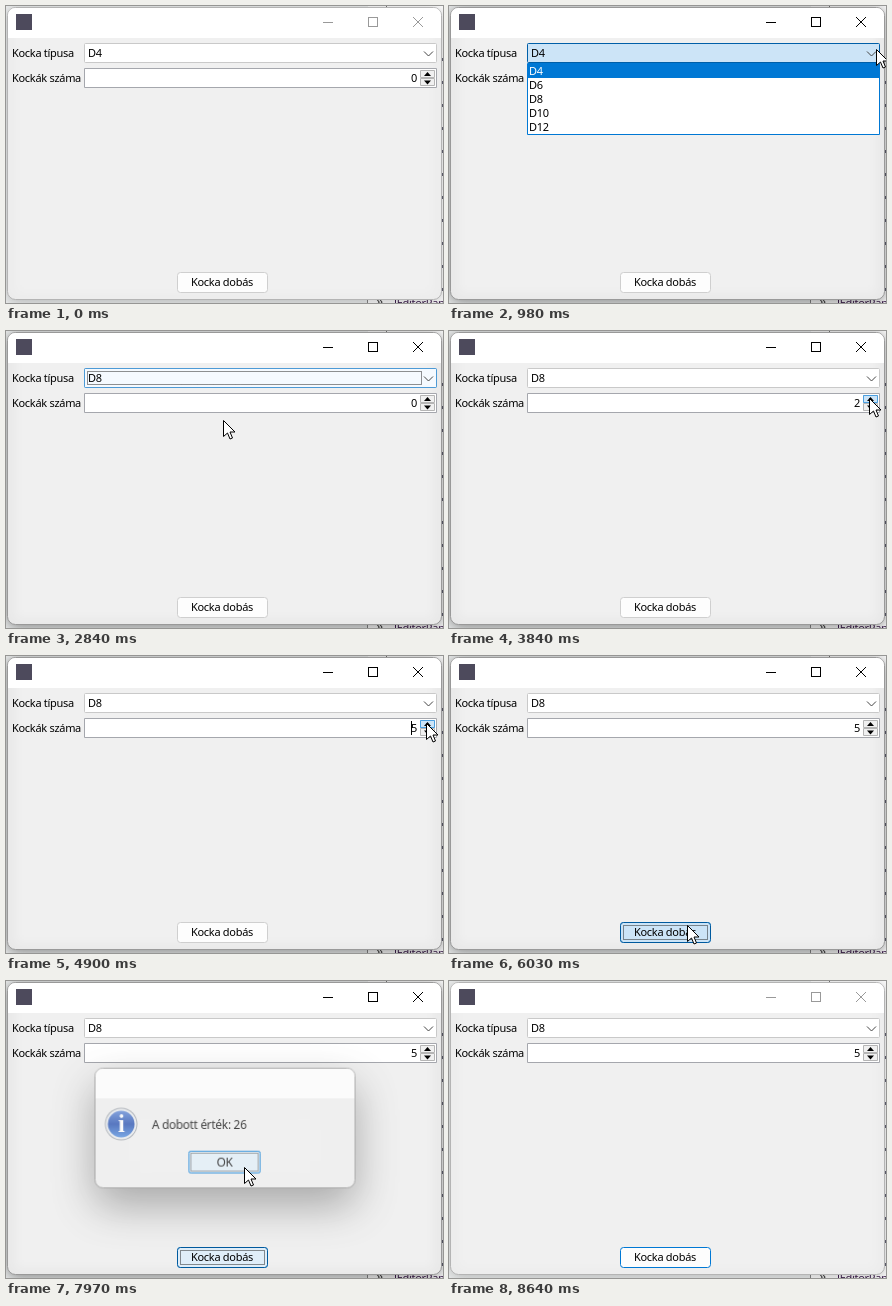
An HTML page with a canvas that plays this animation: 437x297 px, repeating every 8710 ms.

```html
<!DOCTYPE html>
<html lang="hu">
<head>
<meta charset="utf-8">
<style>
  html, body { margin: 0; height: 100%; overflow: hidden; }
  canvas { display: block; width: 437px; height: 297px; }
</style>
</head>
<body>
<canvas id="stage" width="437" height="297"></canvas>
<script>
const LOOP = 8710, W = 437, H = 297;
const BLUE = '#0078d4', PALE = '#e0eef9', FACE = '#f0f0f0';
const TYPES = ['D4', 'D6', 'D8', 'D10', 'D12'];
const CLICKS = [3450, 3720, 3990, 4260, 4570];

// Cursor stops: time, x, y
const PATH = [
  [130, 434, 300], [740, 427, 43], [1180, 427, 43], [1700, 217, 89], [2900, 217, 89],
  [3380, 420, 67], [4970, 420, 67], [5500, 238, 269], [6690, 238, 269],
  [7480, 238, 186], [8050, 238, 186], [8500, 420, 300]
];

const screen = document.getElementById('stage').getContext('2d');
const layer = Object.assign(document.createElement('canvas'), { width: W, height: H });
const layerCtx = layer.getContext('2d');
let g = screen;

const ramp = (t, a, b) => Math.min(1, Math.max(0, (t - a) / (b - a)));
const ease = u => u * u * (3 - 2 * u);
const within = (t, a, b) => t >= a && t < b;

function box(x, y, w, h, fill, stroke, radius = 0) {
  g.beginPath();
  g.roundRect(x + .5, y + .5, w - 1, h - 1, radius);
  g.fillStyle = fill;
  g.fill();
  if (stroke) {
    g.strokeStyle = stroke;
    g.stroke();
  }
}

function line(color, ...points) {
  g.beginPath();
  points.forEach(([x, y]) => g.lineTo(x, y));
  g.strokeStyle = color;
  g.stroke();
}

function polygon(fill, ...points) {
  g.beginPath();
  points.forEach(([x, y]) => g.lineTo(x, y));
  g.closePath();
  g.fillStyle = fill;
  g.fill();
}

function text(s, x, y, { size = 11, color = '#000', align = 'left' } = {}) {
  g.font = `${size}px "Noto Sans", "Open Sans", sans-serif`;
  g.letterSpacing = '-0.3px';
  g.textAlign = align;
  g.fillStyle = color;
  g.fillText(s, x, y);
}

function dotted(x, y, w, h) {
  g.setLineDash([1, 1]);
  g.strokeStyle = '#222';
  g.strokeRect(x + .5, y + .5, w - 1, h - 1);
  g.setLineDash([]);
}

function faded(alpha, draw) {
  if (alpha <= 0) return;
  g.globalAlpha = alpha;
  draw();
  g.globalAlpha = 1;
}

function shadow(color, blur, dy, draw) {
  g.shadowColor = color;
  g.shadowBlur = blur;
  g.shadowOffsetY = dy;
  draw();
  g.shadowColor = 'transparent';
}

function cross(x, y, color) {
  line(color, [x, y], [x + 10, y + 10]);
  line(color, [x + 10, y], [x, y + 10]);
}

function desktop() {
  g.fillStyle = '#eef0f0';
  g.fillRect(0, 0, W, H);
  g.fillStyle = '#fff';
  g.fillRect(362, 0, 75, H);
  text('JEditorPane', 388, 301, { color: '#402050' });
  text('»', 370, 300, { size: 14, color: '#444' });
  line('#888', [361.5, 290], [361.5, H]);
  line('#777', [378, 3], [381, 0]);
  g.fillStyle = '#667';
  for (let y = 52; y < 290; y += 23) g.fillRect(435, y, 2, 3);
}

function frame(active) {
  const ink = active ? '#000' : '#999';
  shadow(`rgba(0,0,0,${active ? .45 : .25})`, 14, 2, () => box(1, 1, 435, 293, FACE, active ? '#999' : '#b4b4b4', 8));
  g.beginPath();
  g.roundRect(2, 2, 433, 30, [7, 7, 0, 0]);
  g.fillStyle = '#fff';
  g.fill();
  g.fillStyle = '#4d4a5c';
  g.fillRect(10, 8, 16, 16);
  line(ink, [317, 16.5], [327, 16.5]);
  g.strokeRect(362.5, 11.5, 9, 9);
  cross(407, 11, ink);
}

function combo(t) {
  const open = within(t, 850, 2640);
  const hover = open ? 1 : t < 2640 ? ramp(t, 680, 850) : 1 - ramp(t, 2640, 3200);
  box(78, 37, 353, 20, '#fff', '#c9c9c9', 1);
  faded(hover, () => box(78, 37, 353, 20, open ? '#cce4f7' : '#f0f8ff', open ? '#005fa8' : BLUE, 1));
  text(t < 2640 ? 'D4' : 'D8', 82, 51);
  line('#444', [418, 45.5], [422.5, 50], [427, 45.5]);
  if (within(t, 2640, 3450)) dotted(81, 40, 335, 14);
}

function popup(pointerY) {
  const selected = Math.max(0, Math.floor((pointerY - 58) / 14));
  box(78, 57, 353, 72, '#fff', BLUE);
  TYPES.forEach((name, i) => {
    if (i === selected) {
      g.fillStyle = BLUE;
      g.fillRect(79, 58 + 14 * i, 351, 14);
    }
    text(name, 80, 69 + 14 * i, { color: i === selected ? '#fff' : '#000' });
  });
}

function spinner(t) {
  const count = CLICKS.filter(c => t >= c).length;
  const pressed = CLICKS.some(c => within(t, c - 20, c + 90));
  const hover = ramp(t, 3300, 3450) * (1 - ramp(t, 5030, 5430));
  box(78, 62, 353, 20, '#fff', '#a5a7ad');
  text(count, 411, 76, { align: 'right' });
  if (within(t, 4900, 5430) || within(t, 5890, 6030)) {
    g.fillStyle = '#000';
    g.fillRect(405, 65, 1, 14);
  }
  box(414, 64, 15, 8, FACE, '#b5b5b5');
  box(414, 72, 15, 8, FACE, '#b5b5b5');
  faded(hover, () => box(414, 64, 15, 8, pressed ? '#a8d1f2' : '#cce4f7', '#4a9fe0'));
  polygon('#000', [418, 70], [421.5, 66], [425, 70]);
  polygon('#000', [418, 74.5], [421.5, 78.5], [425, 74.5]);
}

function rollButton(t, active) {
  const hover = ramp(t, 5430, 5600) * (1 - ramp(t, 8050, 8300));
  const focused = t >= 6030;
  const pressed = within(t, 6030, 6120);
  box(171, 266, 91, 21, '#fdfdfd', focused ? BLUE : '#cfcfcf', 3);
  faded(hover, () => box(171, 266, 91, 21, pressed ? '#cce4f7' : PALE, focused && active ? '#005a9e' : BLUE, 3));
  if (focused && active) dotted(174, 269, 85, 15);
  text('Kocka dobás', 185, 280);
}

function dialog(t) {
  const hover = ramp(t, 7250, 7450);
  shadow('rgba(0,0,0,.42)', 44, 18, () => box(87, 86, 264, 122, FACE, '#8c8c8c', 8));
  g.beginPath();
  g.roundRect(88, 87, 262, 30, [7, 7, 0, 0]);
  g.fillStyle = '#fff';
  g.fill();
  if (t < 7910) cross(330, 96, '#000');

  const blue = g.createLinearGradient(0, 129, 0, 157);
  blue.addColorStop(0, '#5b86d6');
  blue.addColorStop(.5, '#1d49ad');
  blue.addColorStop(1, '#4b8be0');
  for (const [r, fill] of [[16.5, '#9aa0a8'], [15.5, '#e9ecef'], [13.5, blue]]) {
    g.beginPath();
    g.arc(114, 143, r, 0, 7);
    g.fillStyle = fill;
    g.fill();
  }
  g.font = 'bold 25px "Liberation Serif", serif';
  g.textAlign = 'center';
  g.fillStyle = '#fff';
  g.fillText('i', 114, 151);

  text('A dobott érték: 26', 145, 148, { size: 12 });
  box(182, 170, 73, 23, '#fdfdfd', BLUE, 2);
  faded(hover, () => box(182, 170, 73, 23, within(t, 7840, 7910) ? '#cce4f7' : PALE, BLUE, 2));
  dotted(184, 172, 69, 19);
  text('OK', 218.5, 186, { size: 12, align: 'center' });
}

function showDialog(t) {
  const shown = ease(ramp(t, 6150, 6400));
  const closed = ramp(t, 7900, 8150);
  const alpha = shown * (1 - closed);
  if (!alpha) return;
  g = layerCtx;
  g.clearRect(0, 0, W, H);
  dialog(t);
  g = screen;
  const scale = (.92 + .08 * shown) * (1 - .04 * closed);
  g.save();
  g.translate(218.5, 147);
  g.scale(scale, scale);
  g.globalAlpha = alpha;
  g.drawImage(layer, -218.5, -147);
  g.restore();
}

function pointer(t) {
  const i = PATH.findIndex(p => p[0] > t);
  if (i < 1) return [W + 20, H + 20];
  const [t0, x0, y0] = PATH[i - 1], [t1, x1, y1] = PATH[i];
  const u = ease(ramp(t, t0, t1));
  return [Math.round(x0 + (x1 - x0) * u), Math.round(y0 + (y1 - y0) * u)];
}

function arrow(x, y) {
  g.save();
  g.translate(x + .5, y + .5);
  polygon('#fff', [0, 0], [0, 16], [4, 12.5], [6.5, 18.5], [9, 17.5], [6.5, 11.5], [11.5, 11.5]);
  g.closePath();
  g.strokeStyle = '#000';
  g.stroke();
  g.restore();
}

function draw(t) {
  const active = within(t, 780, 6150) || within(t, 7900, 8570);
  const [x, y] = pointer(t);
  desktop();
  frame(active);
  text('Kocka típusa', 6, 51);
  text('Kockák száma', 6, 76);
  combo(t);
  spinner(t);
  rollButton(t, active);
  if (within(t, 850, 2640)) popup(y);
  showDialog(t);
  arrow(x, y);
}

const start = performance.now();
function tick() {
  draw((performance.now() - start) % LOOP);
  requestAnimationFrame(tick);
}
tick();
</script>
</body>
</html>
```
